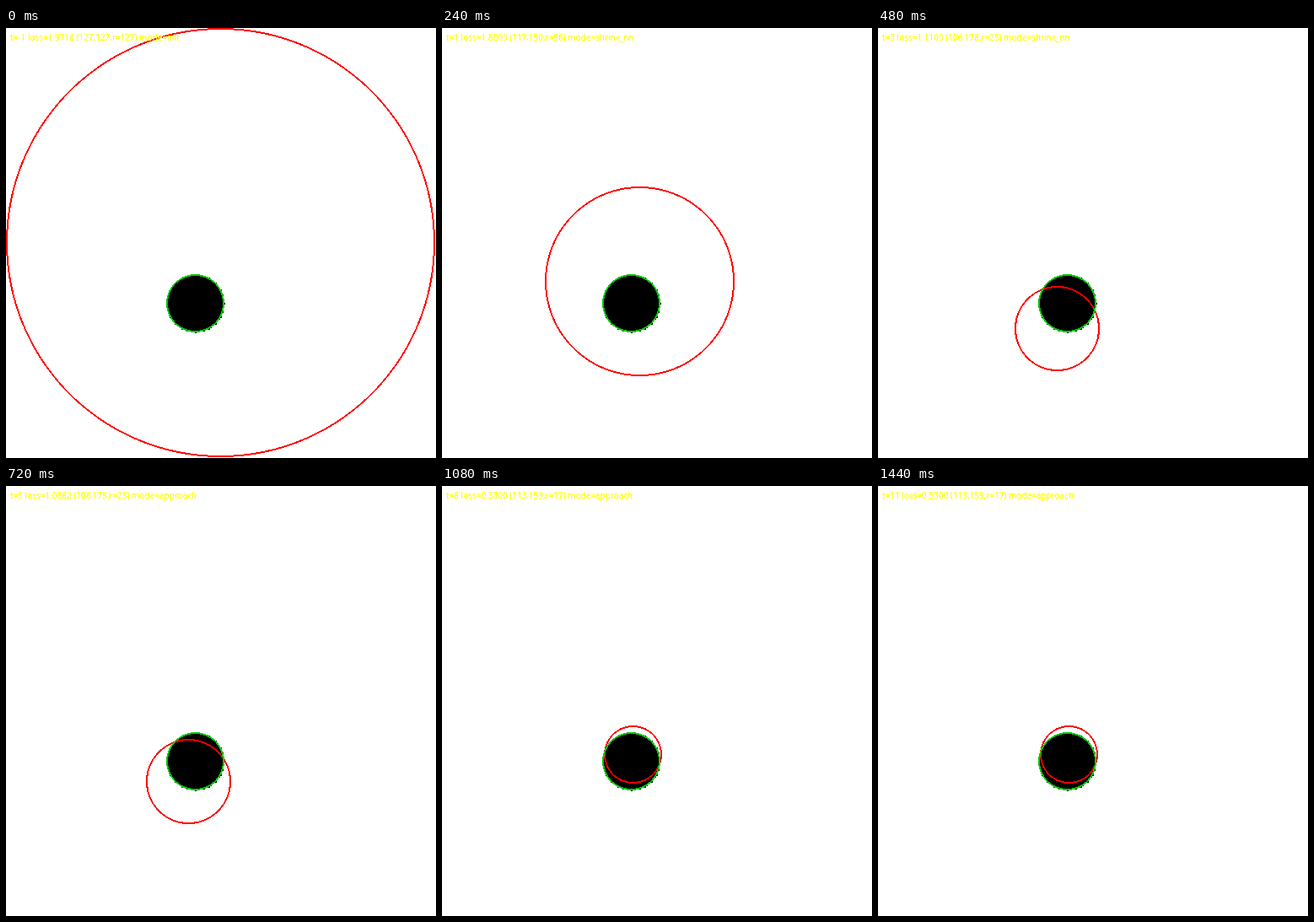
An HTML page with a canvas for the animation above (1.56 s loop, 510 px wide and 510 px high).

```html
<!DOCTYPE html>
<html lang="en">
<head>
<meta charset="utf-8">
<title>Circle search</title>
<style>
  html, body { margin: 0; height: 100%; overflow: hidden; background: #fff; }
  canvas { display: block; }
</style>
</head>
<body>
<canvas id="stage" width="510" height="510"></canvas>
<script>
const ctx = document.getElementById('stage').getContext('2d', { willReadFrequently: true });
const STEP_MS = 120, STEPS = 13, SCALE = 2;
const goal = { x: 112, y: 163, r: 17 };

// Key points of the search path: step, x, y, loss
const path = [
  [0, 127, 127, 1.9718],
  [2, 117, 150, 1.8603],
  [4, 106, 178, 1.1103],
  [5, 106, 179, 1.0527],
  [6, 108, 175, 1.0682],
  [7, 110, 168, 1.4337],
  [9, 113, 159, 0.53],
  [11, 113, 157, 0.6418],
  [12, 113, 159, 0.53]
];

function stateAt(step) {
  const k = Math.max(1, path.findIndex(key => key[0] >= step));
  const a = path[k - 1], b = path[k];
  const u = (step - a[0]) / (b[0] - a[0]);
  const mix = n => a[n] + (b[n] - a[n]) * u;
  // The radius shrinks by a third, pauses during the approach, then shrinks once more
  const shrinks = Math.min(step, 4) + (step > 7);
  return {
    x: Math.round(mix(1)),
    y: Math.round(mix(2)),
    r: Math.round(127 * (2 / 3) ** shrinks),
    loss: mix(3).toFixed(4),
    mode: step === 0 ? 'init' : step < 5 ? 'shrink_nn' : 'approach'
  };
}

// Text with hard pixel edges
function label(text) {
  ctx.font = '10px "Open Sans", sans-serif';
  ctx.fillStyle = '#ff0';
  ctx.fillText(text, 5, 15);
  const image = ctx.getImageData(0, 0, 300, 24);
  for (let k = 0; k < image.data.length; k += 4) {
    const on = image.data[k + 3] > 105;
    image.data.set(on ? [255, 255, 0, 255] : [0, 0, 0, 0], k);
  }
  ctx.putImageData(image, 0, 0);
}

// Two-pixel outline, walked through one octant and mirrored
function ring({ x, y, r }, color) {
  const R = r * SCALE;
  const edge = (radius, m) => Math.round(Math.sqrt(radius * radius - m * m));
  ctx.fillStyle = color;
  for (let m = 0; m <= edge(R, m); m++) {
    for (let n = Math.max(m, edge(R - 1, m) || 0); n <= edge(R, m); n++) {
      for (const sx of [-1, 1]) {
        for (const sy of [-1, 1]) {
          ctx.fillRect(x * SCALE + sx * m, y * SCALE + sy * n, 1, 1);
          ctx.fillRect(x * SCALE + sx * n, y * SCALE + sy * m, 1, 1);
        }
      }
    }
  }
}

function disc({ x, y, r }) {
  ctx.fillStyle = '#000';
  for (let dy = -r; dy <= r; dy++) {
    const half = Math.floor(Math.sqrt(r * r - dy * dy));
    ctx.fillRect((x - half) * SCALE, (y + dy) * SCALE, (2 * half + 1) * SCALE, SCALE);
  }
}

// Painted from the top layer down
function draw(step) {
  const guess = stateAt(step);
  const { x, y, r, loss, mode } = guess;
  ctx.globalCompositeOperation = 'source-over';
  ctx.clearRect(0, 0, 510, 510);
  label(`t=${step - 1} loss=${loss} (${x},${y},r=${r}) mode=${mode}`);
  ctx.globalCompositeOperation = 'destination-over';
  ring(goal, '#00c800');
  ring(guess, '#f00');
  disc(goal);
  ctx.fillStyle = '#fff';
  ctx.fillRect(0, 0, 510, 510);
}

let shown = -1;
const start = performance.now();
function tick() {
  const step = Math.floor((performance.now() - start) / STEP_MS) % STEPS;
  if (step !== shown) draw(shown = step);
  requestAnimationFrame(tick);
}
tick();
</script>
</body>
</html>
```
